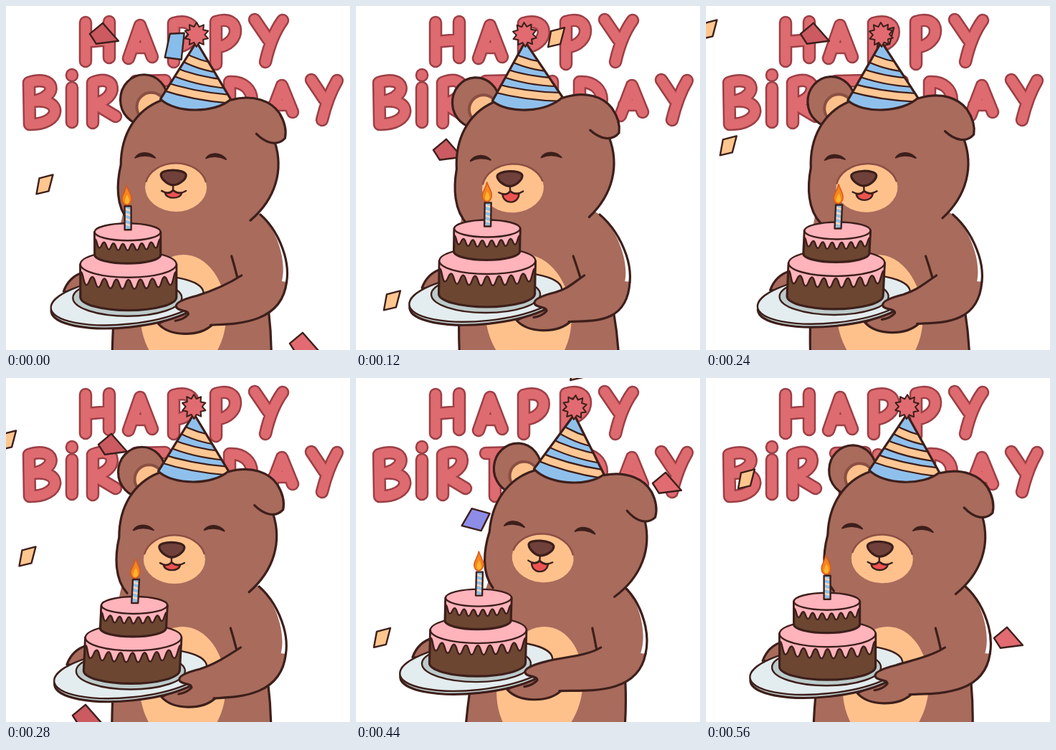
Write an HTML page that moves like this. It is 480 px wide and 480 px high and loops after 0.6 s.

```html
<!DOCTYPE html>
<html lang="en">
<head>
<meta charset="utf-8">
<title>Happy Birthday</title>
<style>
html, body { margin: 0; width: 100%; height: 100%; overflow: hidden; background: #fff; }
svg { display: block; width: 100vw; height: 100vh; }
.ink { stroke: #3d1f1b; stroke-width: 3.2; stroke-linecap: round; stroke-linejoin: round; }
.thin { stroke-width: 2.4; }
.none { fill: none; }
.fur { fill: #a86b5c; }
.tan { fill: #ffc18c; }
.pink { fill: #ffb3bb; }
.choc { fill: #6c4631; }
.red { fill: #e16b71; }
.letters { fill: none; stroke-linecap: round; stroke-linejoin: round; }
</style>
</head>
<body>
<svg viewBox="0 0 480 480" role="img" aria-label="HAPPY BiRTHDAY">
  <defs>
    <path id="words" d="M111 23V77M144 22V72M111 50L144 47
      M171 73L187 27L204 71M176 58H199
      M234 24V78M234 24C271 13 271 56 234 58
      M293 22V81M293 22C328 10 330 54 293 58
      M347 19L366 47M386 20Q370 42 362 78
      M32 107L33 165M32 107C68 95 75 126 38 133C81 128 77 166 33 165
      M92 96V97M92 114V162
      M121 107V163M121 107C155 93 158 130 123 136L153 154
      M181 105L222 104M194 106V165
      M240 107V160M274 105V160M240 134H274
      M312 106V158M312 106C353 104 353 156 312 158
      M369 153L385 111L400 148M374 138H396
      M426 103L444 130M462 104Q449 126 441 159"/>
    <path id="cone" d="M264 50L214 130C235 150 290 150 312 130Z"/>
    <clipPath id="inCone"><use href="#cone"/></clipPath>
    <clipPath id="inWax"><rect x="165.500" y="280" width="9" height="33"/></clipPath>
  </defs>

  <g class="letters">
    <use href="#words" stroke="#9c3f45" stroke-width="18.500"/>
    <use href="#words" stroke="#de6b70" stroke-width="13.500"/>
  </g>

  <g id="confetti"></g>

  <g id="body">
    <path class="fur" d="M165 280C150 330 149 400 148 490H370L367 420L384 385C392 355 376 310 354 291L330 275Z"/>
    <ellipse class="tan" cx="247" cy="430" rx="60" ry="83"/>
    <path class="ink none" d="M153 400C150 430 148 460 148 490M354 291C371 306 382 327 388 347C392 361 393 372 391 385M366 425C369 450 370 470 370 490"/>
  </g>

  <g id="head">
    <ellipse class="ink fur" cx="191" cy="131" rx="33" ry="35"/>
    <ellipse class="tan" stroke="#8a4f43" stroke-width="4" cx="201" cy="141" rx="20" ry="20"/>
    <path class="fur" d="M172 303C152 280 153 248 159 222C159 180 179 146 215 132C240 122 290 122 312 130C330 126 355 130 370 145L374 190C386 228 376 270 340 299L300 315H200Z"/>
    <path class="ink none" d="M170 300C152 280 153 248 159 222C159 180 179 146 215 132M374 190C386 228 376 268 340 299"/>
    <path class="ink fur" d="M312 131C345 122 369 133 380 149C388 162 390 174 388 184C377 196 361 191 348 178"/>
    <path id="eye" class="ink" style="stroke-width:2" fill="#3d1f1b" d="M179 212C185 203 199 203 207 212C198 208 187 208 179 212Z"/>
    <use href="#eye" transform="translate(99 1) rotate(3 193 210)"/>
    <ellipse class="tan" cx="236" cy="253" rx="43" ry="34"/>
    <path class="none" stroke="#8c4e43" stroke-width="2.500" d="M194 246A43 34 0 0 1 278 246"/>
    <path id="tongue" class="ink thin" fill="#ed5350"/>
    <path class="ink none thin" d="M232 248V257M216 258Q226 264 232 257Q240 264 250 258"/>
    <path class="ink" fill="#70403a" d="M215 236C214 227 249 227 250 236C250 243 239 250 232 250C226 250 216 243 215 236Z"/>
    <use href="#cone" fill="#8fc0ec"/>
    <g id="bands" class="none" clip-path="url(#inCone)"></g>
    <use href="#cone" class="ink none"/>
    <path id="pompom" class="ink red" style="stroke-width:2"/>
  </g>

  <g class="plateMove">
    <path class="ink fur" d="M80 399C85 385 95 376 108 372L112 402Z"/>
    <path class="ink fur" d="M212 444C228 462 268 463 287 446L262 420Z"/>
    <g transform="rotate(-6 169 414)">
      <ellipse class="ink" fill="#c3cfd0" cx="169" cy="416" rx="107" ry="33"/>
      <ellipse class="ink thin" fill="#e3ecee" cx="169" cy="411.500" rx="107" ry="33"/>
    </g>
    <ellipse class="ink thin" fill="#bccaca" cx="169" cy="408" rx="76" ry="25.500"/>
  </g>

  <g class="plateMove"><g id="cake"></g></g>

  <path id="arm" class="fur"/>
  <path id="armLine" class="ink none"/>
</svg>

<script>
const LOOP = 600, HOLD = 40;
const $ = id => document.getElementById(id);
const set = (el, attrs) => {
  for (const k in attrs) el.setAttribute(k, attrs[k]);
  return el;
};
const add = (parent, tag, attrs) =>
  parent.appendChild(set(document.createElementNS('http://www.w3.org/2000/svg', tag), attrs));

// Hat bands and pompom
for (let i = 0; i < 3; i++) {
  const w = 62 + 20 * i;
  const d = `M${240 - 14 * i} ${68 + 21 * i}q${w / 2 - 4} 16 ${w} 20`;
  add($('bands'), 'path', { d, stroke: '#3d1f1b', 'stroke-width': 14 });
  add($('bands'), 'path', { d, stroke: '#ffc793', 'stroke-width': 9.5 });
}
const spikes = Array.from({ length: 20 }, (_, i) => {
  const r = i % 2 ? 11.5 : 17, a = i * Math.PI / 10;
  return `${264 + r * Math.sin(a)} ${40 - r * Math.cos(a)}`;
});
set($('pompom'), { d: 'M' + spikes.join('L') + 'Z' });

// One cake layer: sponge, dripping icing, icing top
const cake = $('cake');
function tier(cx, rx, top, bottom, ry, drip, amp, count) {
  const l = cx - rx, r = cx + rx, n = count * 2;
  add(cake, 'path', {
    class: 'ink choc',
    d: `M${l} ${top}V${bottom}A${rx} ${ry} 0 0 0 ${r} ${bottom}V${top}Z`
  });
  let d = `M${l} ${top}`, px = l, py;
  for (let i = 0; i <= n; i++) {
    const u = i / n * 2 - 1;
    const x = cx + rx * u;
    const y = drip + ry * 0.6 * Math.sqrt(1 - u * u) + (i % 2 ? amp : -amp);
    const mx = (px + x) / 2;
    d += i ? `C${mx} ${py} ${mx} ${y} ${x} ${y}` : `L${x} ${y}`;
    px = x;
    py = y;
  }
  add(cake, 'path', { class: 'ink pink thin', d: d + `L${r} ${top}Z` });
  add(cake, 'ellipse', { class: 'ink pink thin', cx, cy: top, rx, ry });
}
tier(170.5, 67, 361, 407, 18.5, 378, 6.5, 8);
tier(169.5, 46, 316, 348, 12, 330, 4.5, 7);

const wax = { x: 165.5, y: 280, width: 9, height: 33 };
add(cake, 'rect', { fill: '#8fbfe0', ...wax });
add(cake, 'path', {
  'clip-path': 'url(#inWax)', fill: 'none', stroke: '#f3d9c4', 'stroke-width': 2.5,
  d: [0, 1, 2, 3, 4].map(i => `M163 ${283 + i * 7}l14 4`).join('')
});
add(cake, 'rect', { class: 'ink none thin', ...wax });
add(cake, 'path', {
  fill: '#f5861f', stroke: '#d9591b', 'stroke-width': 1.5,
  d: 'M168 251C171 260 175 263 175 270C175 281 162 281 162 270C162 264 167 260 168 251Z'
});
add(cake, 'path', { fill: '#ffb52e', d: 'M169 264C174 272 172 277 169 277C165 277 164 272 169 264Z' });

// Paper scraps: each has the tick at which it enters the stage and its x there
const FALL = 54, TICKS = 18, CUT = 9;
const wedge = 'M-20 1L-2-14L20 11L-11 15Z';
const strip = 'M-8-8L11-13L5 10L-12 14Z';
const flag = 'M-6-15L19-8L7 16L-20 9Z';
const tall = 'M-6-18L14-19L10 18L-13 15Z';
const scraps = [];
function scatter(d, fill, drift, ...starts) {
  for (const [born, x] of starts)
    scraps.push({ born, x, drift, el: add($('confetti'), 'path', { class: 'ink thin', d, fill }) });
}
scatter(wedge, '#cb5a61', -3, [17.3, 139], [24.3, 154]);
scatter(wedge, '#e16b71', -3, [9.3, 442]);
scatter(strip, '#ffc68e', -1.2, [13.4, 60], [21.4, 36], [24.4, 5], [5.3, 45], [9.35, 292],
  [1.7, 130], [12.2, 311], [20.2, 281], [24.2, 252]);
scatter(flag, '#8d8de8', -1.2, [8.35, 172], [1.1, 16]);
scatter(tall, '#86bdea', -1.2, [16.95, 236], [2, 393]);

// Cosine with n cycles per loop that peaks at the given time
const wave = (t, n, peak) => Math.cos(2 * Math.PI * n * (t - peak) / LOOP);
const LEAN = 0.003, FOOT = 553;

function draw(t) {
  const sway = 2 - 23 * wave(t, 1, 160) + 4 * wave(t, 3, 80);
  const mouth = Math.min(1, 0.7 - 0.7 * wave(t, 2, 0));
  const px = 4 + 7.5 * wave(t, 1, 165) + 2.7 * wave(t, 2, 170);
  const py = -4 + 5 * wave(t, 2, 20) - 2 * wave(t, 1, 520);
  const tilt = (2.3 - 2.5 * wave(t, 1, 0)) / 91;

  set($('head'), { transform: `translate(${sway} ${-0.08 * sway}) rotate(${0.175 * sway} 232 239)` });
  set($('body'), { transform: `matrix(1 0 ${-LEAN * sway} 1 ${LEAN * sway * FOOT} 0)` });
  const lip = 270 + mouth * 6;
  set($('tongue'), { d: `M221 261Q228 262 232 257Q237 262 244 261C243 ${lip} 222 ${lip} 221 261Z` });
  for (const g of document.querySelectorAll('.plateMove')) set(g, { transform: `translate(${px} ${py})` });
  set(cake, { transform: `matrix(1 0 ${-tilt} 1 ${tilt * 407} 0)` });

  // The arm hangs between the swaying body and the plate
  const b = (x, y) => `${x + sway * LEAN * (FOOT - y)} ${y} `;
  const p = (x, y) => `${x + px} ${y + py} `;
  const upper = 'M' + b(328, 376) + 'C' + b(308, 389) + p(285, 399) + p(266, 405) +
    'C' + p(250, 409) + p(236, 414) + p(237, 420) +
    'C' + p(238, 427) + p(254, 424) + p(254, 431);
  const lower = 'C' + p(315, 444) + b(384, 446) + b(391, 385);
  set($('arm'), { d: upper + 'L' + p(248, 437) + 'L' + p(270, 449) + 'L' + p(285, 446) + lower + 'Z' });
  set($('armLine'), {
    d: upper + 'Q' + p(248, 438) + p(236, 440) +
      'M' + p(285, 446) + lower +
      'M' + b(314, 349) + 'Q' + b(318, 362) + b(322, 378)
  });

  // Scraps drop a notch per tick; the shower restarts at the cut
  const tick = Math.floor((t + 7) / 34.4);
  const now = tick < CUT ? tick + TICKS : tick;
  for (const { el, born, x, drift } of scraps) {
    const age = now - born;
    set(el, { transform: `translate(${x + drift * age} ${FALL * age})` });
  }
}

const start = performance.now();
function frame() {
  const t = (performance.now() - start) % LOOP;
  draw(Math.floor(t / HOLD) * HOLD);
  requestAnimationFrame(frame);
}
frame();
</script>
</body>
</html>
```
